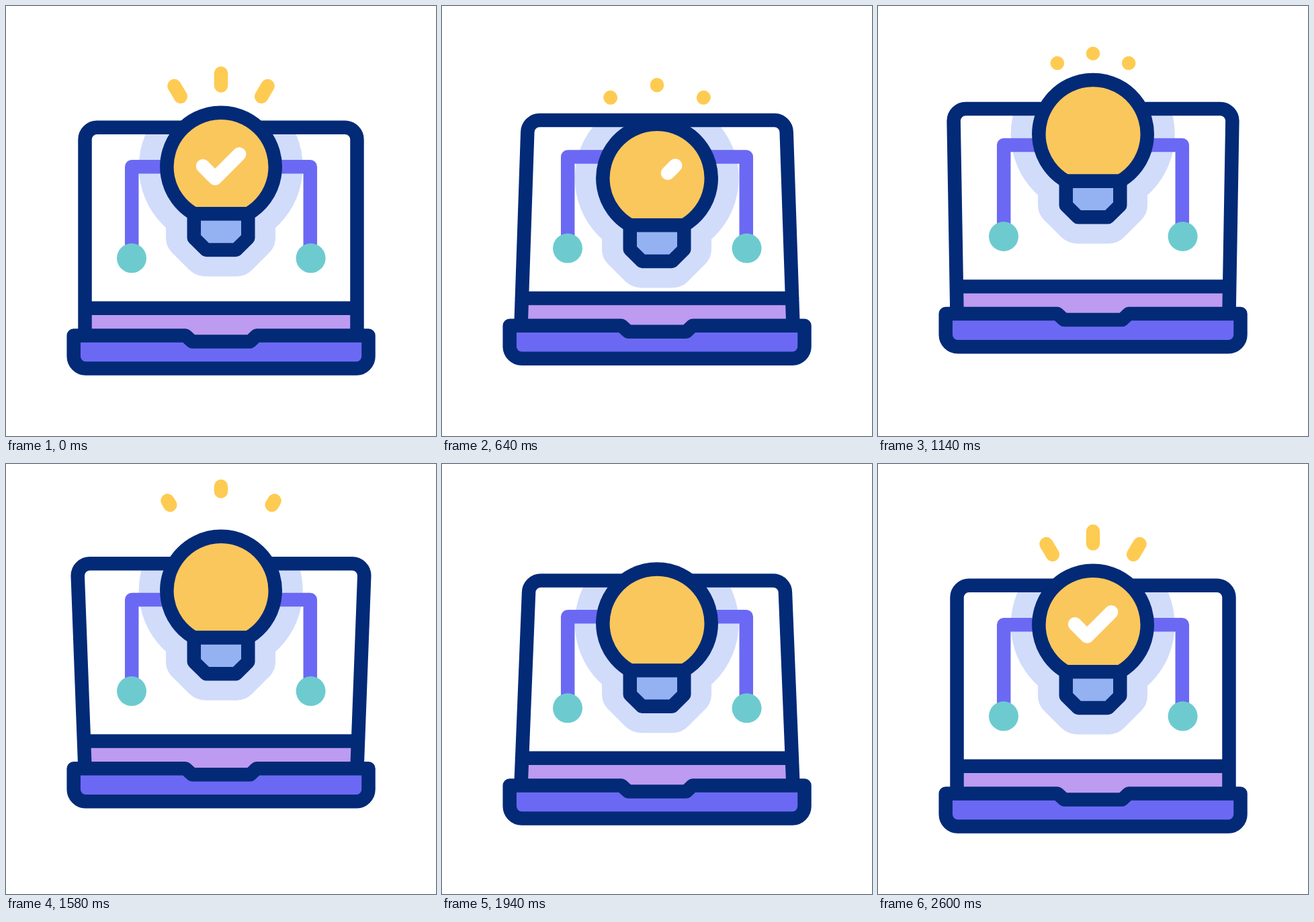
Write an HTML page that moves like this. It is 640x640 px and loops after 3 s.

```html
<!DOCTYPE html>
<html lang="en">
<head>
<meta charset="utf-8">
<title>Bright idea on a laptop</title>
<style>
  html, body { margin: 0; width: 100%; height: 100%; overflow: hidden; background: #fff; }
  svg { display: block; width: 100vw; height: 100vh; }
  .line { fill: none; stroke: #032a77; stroke-width: 20.5; stroke-linecap: round; stroke-linejoin: round; }
  .wire { stroke: #6b69f3; stroke-linecap: butt; }
  .ray { stroke: #fecb52; }
  .check { stroke: #fff; }
</style>
</head>
<body>
<svg viewBox="0 0 640 640">
  <defs>
    <clipPath id="clip"><path id="glass"/></clipPath>
  </defs>
  <g clip-path="url(#clip)">
    <g id="halo" fill="#d1dcfb">
      <circle cx="319.7" cy="239.3" r="122"/>
      <path d="M238 326L250 300H390L401 326V345Q401 358 392 367L367 392Q357 402.5 343 402.5H297Q283 402.5 272 392L247 367Q238 358 238 345Z"/>
    </g>
  </g>
  <g id="bezel">
    <path fill="#bc9bf0" d="M119 450H521V492H119Z"/>
    <path class="line" d="M119 449.8H521"/>
  </g>
  <path id="screen" class="line"/>
  <g id="laptop">
    <path class="line" style="fill:#6b69f3" d="M100.7 490.4H267L277 499.4H363.5L373 490.4H539.5V521.5A18 18 0 0 1 521.5 539.5H118.7A18 18 0 0 1 100.7 521.5Z"/>
    <path class="line wire" d="M187.2 370V239.3H270M452.8 370V239.3H370"/>
    <g fill="#6dcbcf">
      <circle cx="187" cy="375.3" r="22"/>
      <circle cx="453.6" cy="375.3" r="22"/>
    </g>
  </g>
  <path id="rays" class="line ray"/>
  <g id="bulb">
    <path class="line" style="fill:#fac75c" d="M279.8 309.3A80.7 80.7 0 1 1 360.3 309.3Z"/>
    <path class="line" style="fill:#94b2f2" d="M279.8 309.3H360.3V345.3L342.4 363H297.8L279.8 345.3Z"/>
    <path id="check" class="line check" pathLength="1" d="M293 238.2L311.2 256.6L347.2 220.5"/>
  </g>
</svg>
<script>
const $ = id => document.getElementById(id);
const LOOP = 3000, REST = 210, END = 2600;
const RAY = 18.3;    // length of a ray at rest
const HIDDEN = 42;   // ray start tucked behind the bulb

// Smooth curve through a few [time, value] poses; it comes to rest at each extreme.
function curve(...keys) {
  const last = keys.length - 1;
  const slope = j => (keys[j + 1][1] - keys[j][1]) / (keys[j + 1][0] - keys[j][0]);
  const tangent = j => {
    if (j === 0 || j === last) return 0;
    const a = slope(j - 1), b = slope(j);
    return a * b <= 0 ? 0 : 2 * a * b / (a + b);
  };
  return t => {
    if (t <= keys[0][0]) return keys[0][1];
    if (t >= keys[last][0]) return keys[last][1];
    const i = keys.findIndex(k => k[0] > t) - 1;
    const [t0, v0] = keys[i], [t1, v1] = keys[i + 1];
    const h = t1 - t0, u = (t - t0) / h, w = 1 - u;
    return v0 * (1 + 2 * u) * w * w + tangent(i) * h * u * w * w
         + v1 * (3 - 2 * u) * u * u - tangent(i + 1) * h * u * u * w;
  };
}

// The laptop floats up and leans; the bulb dips, jumps, lands and settles.
const laptopY = curve([REST, 0], [840, -23.3], [1140, -32.3], [1580, -37.2], [1940, -12], [2360, 1], [END, 0]);
const tilt = curve([REST, 0], [790, 11.7], [1330, -11.4], [1540, -11.4], [1960, 11.7], [END, 0]);
const lidDrop = curve([REST, 0], [790, 4.6], [1960, 4.6], [END, 0]);
const bulbY = curve([REST, 0], [460, 17], [638, 17], [1218, -52], [1534, -52], [2142, 15], [END, 0]);

// Ray ends, measured inward from the rest position, and the rays' lead over the bulb.
const near = curve([340, 0], [680, -RAY], [1020, HIDDEN], [1140, 14], [1580, -30.5], [1660, -40], [2000, HIDDEN], [2560, 0]);
const far = curve([680, -RAY], [1020, HIDDEN], [1140, 14], [1580, -38], [1660, -40], [2000, HIDDEN], [2400, -RAY]);
const lead = curve([1020, 0], [1140, -13], [1580, 3.5], [2000, 0]);
const raysShown = t => t < 680 || (t > 1020 && t < 1660) || t > 2000;

const wipeOut = curve([400, 0], [740, 1]);
const wipeIn = curve([2100, 0], [2560, 1]);

const set = (id, name, value) => $(id).setAttribute(name, value);
const shift = (y, ...ids) => ids.forEach(id => set(id, 'transform', `translate(0 ${y})`));

function screenPath(y, lean, drop) {
  const l = 117.5 + lean, r = 522.5 - lean, top = 180.8 + y + drop, foot = 490.4 + y;
  return `M117.5 ${foot}L${l} ${top + 18}A18 18 0 0 1 ${l + 18} ${top}H${r - 18}` +
         `A18 18 0 0 1 ${r} ${top + 18}L522.5 ${foot}`;
}

function rayPath(a, b, y) {
  const point = (dir, d) => dir
    ? `${320 + dir * (60.2 - d * .508)} ${134.8 + d * .862 + y}`
    : `320 ${118.6 + d + y}`;
  return [-1, 0, 1].map(dir => `M${point(dir, a)}L${point(dir, b - .01)}`).join('');
}

function draw(t) {
  const base = laptopY(t), lamp = bulbY(t);
  const outline = screenPath(base, tilt(t), lidDrop(t));
  set('screen', 'd', outline);
  set('glass', 'd', outline + 'Z');
  shift(base, 'laptop', 'bezel');
  shift(lamp, 'bulb', 'halo');
  set('rays', 'd', raysShown(t) ? rayPath(near(t), far(t), lamp + lead(t)) : '');

  const leaving = t < LOOP / 2;
  const from = leaving ? wipeOut(t) : 0, to = leaving ? 1 : wipeIn(t);
  $('check').style.display = to > from ? '' : 'none';
  set('check', 'stroke-dasharray', `${to - from} 2`);
  set('check', 'stroke-dashoffset', -from);
}

const began = performance.now();
function tick() {
  draw((performance.now() - began) % LOOP);
  requestAnimationFrame(tick);
}
tick();
</script>
</body>
</html>
```
